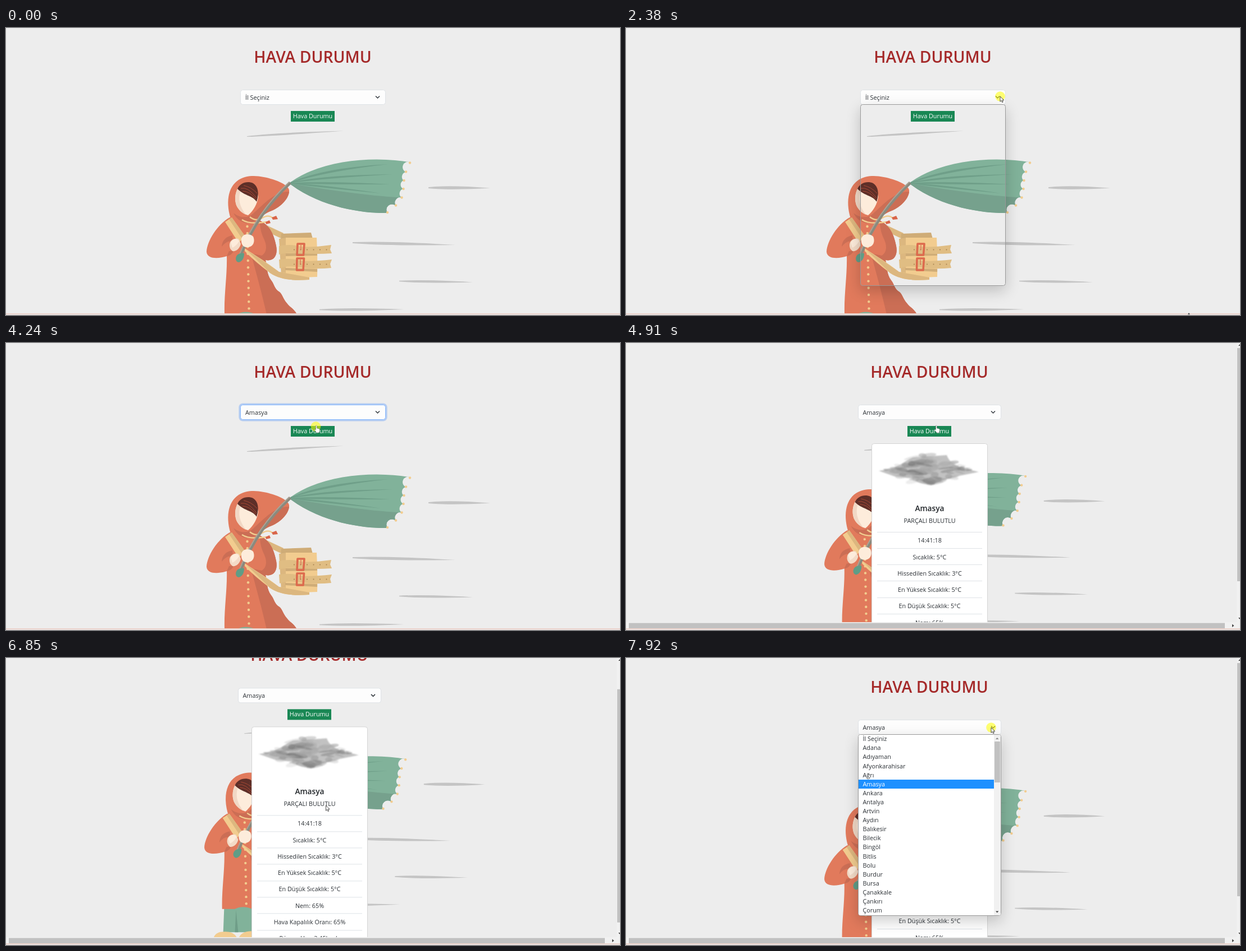
These frames come from a looping animation (1093 by 512 pixels, 7.99 s). An HTML page:

```html
<!DOCTYPE html>
<html lang="tr">
<head>
<meta charset="utf-8">
<title>Hava Durumu</title>
<style>
html, body { margin: 0; width: 100%; height: 100%; overflow: hidden; background: #ededed; }
body { position: relative; font: 10.8px "Open Sans", "Noto Sans", sans-serif; color: #2b3035; }
div, svg { position: absolute; box-sizing: border-box; white-space: nowrap; }
svg { overflow: visible; left: 0; top: 0; }
#view { left: 0; top: 0; width: 100%; overflow: hidden; }
#scene { width: 1093px; height: 640px; transform-origin: 0 0; }
#page { top: 0; width: 1093px; }
#title { top: 31px; left: 0; width: 1092px; text-align: center; font: 600 28.3px/40px "Open Sans", "Noto Sans", sans-serif; color: #a52a2a; }
#select { top: 109.5px; height: 27px; line-height: 25px; padding-left: 8px; background: #fdfdfd; border: 1px solid #dee2e6; border-radius: 4.5px; }
#select.focus { border-color: #86b7fe; box-shadow: 0 0 0 2.6px rgba(13,110,253,.25); }
#select svg { left: auto; right: 9px; top: 9px; width: 9px; height: 7px; }
#button { left: 507px; top: 148px; width: 78px; height: 19px; font-size: 10.8px; line-height: 18.5px; text-align: center; background: #198754; color: #fff; }
#card { left: 443px; top: 178.5px; width: 206.5px; height: 393px; background: #fff; border: 1px solid #d4d4d4; border-radius: 4.5px; text-align: center; }
#card div { left: 9px; width: 187px; height: 20px; line-height: 20px; }
#card .rule { height: 1px; background: #dee2e6; }
#card .city { font-size: 13.7px; font-weight: 600; color: #212529; }
#popup { top: 136px; height: 323.5px; border: 1px solid #999; border-radius: 4.5px; box-shadow: 0 9px 26px rgba(0,0,0,.2); overflow: hidden; }
#list { inset: 0; background: #fff; }
#list .row { left: 0; right: 11.5px; height: 16.1px; line-height: 16.1px; padding-left: 8px; }
#list .on { background: #1e90ff; color: #fff; }
#bar { right: 0; top: 0; width: 11.5px; height: 100%; background: #f1f1f1; }
#bar div { left: 1px; top: 12px; width: 9.5px; height: 73px; background: #c1c1c1; }
#foot { left: 0; top: 509.3px; width: 100%; height: 2px; background: #ecd3cc; }
</style>
</head>
<body>
<div id="view">
  <svg id="scene">
    <g id="wind" fill="#c4c4c4"></g>
    <!-- legs -->
    <path fill="#81b29a" d="M393 500H475V552H391Z"/>
    <path fill="#6f9d88" d="M414 512L418 552H412Z"/>
    <path fill="#f2cc8f" d="M373 565Q375 551 393 551Q412 550 417 565ZM418 565Q422 550 442 550Q465 552 468 565Z"/>
    <!-- far strap and bag -->
    <path fill="#dcb77f" d="M462 351L494 366L489 375L466 364Z"/>
    <path fill="#cfac77" d="M490 367L543 365L546 376L489 378Z"/>
    <path fill="#dcb77f" d="M486 376L500 374L502 446L490 442Z"/>
    <path fill="#f2cc8f" d="M498 374L553 374Q555 410 554 444L498 446Z"/>
    <path fill="#cfac77" d="M497 428L554 430V435L497 432ZM498 402L554 401V406L498 407Z"/>
    <!-- coat -->
    <path fill="#e17a5c" d="M398 338C376 351 358 380 357 399C358 414 381 411 393 407C394 440 388 475 389 510L412 510Q426 503 443 510L518 511C512 500 506 499 500 491C493 483 492 475 487 471C477 465 478 457 472 450C464 440 465 426 462 414C478 417 484 404 481 389C477 368 469 352 450 342Z"/>
    <path fill="#cb6e55" d="M452 344C470 352 477 368 481 389C484 404 478 417 462 414C465 426 464 440 472 450C478 457 477 465 487 471C492 475 493 483 500 491C506 499 512 500 518 511L464 511C456 475 446 440 436 402L455 406C463 402 466 390 459 376C454 365 452 356 452 344Z"/>
    <path fill="#cb6e55" d="M403 370C391 372 385 379 384 390Q393 378 404 381ZM393 407Q403 405 405 397L397 398Z"/>
    <g id="buttons" fill="#f2cc8f"></g>
    <!-- hood and face -->
    <path fill="#e17a5c" d="M401 343C391 314 394 284 414 271C433 259 458 265 475 270C490 275 506 283 504 292C503 305 488 321 468 328C451 336 445 350 428 350C414 350 406 348 401 343Z"/>
    <path fill="#cb6e55" d="M504 292C503 305 488 321 468 328C451 336 445 349 428 348C417 346 409 339 405 330C414 338 430 341 440 331C456 317 478 291 504 292Z"/>
    <path fill="#fdecdb" d="M413 285C407 296 407 307 410 316C414 325 424 333 431 334C440 327 448 313 449 300C448 286 421 275 413 285Z"/>
    <path fill="#f1d8c5" d="M413 286C407 296 407 307 410 316C413 324 420 330 427 333C416 319 412 304 418 290Z"/>
    <path fill="#5e2f28" d="M412 287C416 277 429 272 440 277C449 283 451 295 446 310C440 299 425 300 412 287Z"/>
    <path fill="none" stroke="#a94a37" d="M418 286Q431 283 446 303M423 281Q436 283 447 295M421 291Q434 291 444 305"/>
    <path fill="none" stroke="#f2cc8f" stroke-width="2.4" d="M420 342Q433 351 464 346M434 337Q445 346 456 339T475 339"/>
    <path fill="#d9654a" d="M462 346L469 343L471 348L463 350ZM473 338L481 335L484 341L475 342Z"/>
    <!-- near strap, belts -->
    <path fill="#f2cc8f" d="M390 346L402 338L426 372L414 383ZM425 393C447 408 465 418 486 435L540 444V449C510 451 488 449 470 437Q442 416 425 398Z"/>
    <path fill="#dcb77f" d="M402 338L426 372L421 377L397 341ZM428 396Q455 413 486 435L540 445V449C510 451 488 449 470 437Q460 427 428 396Z"/>
    <path fill="#e0bd83" d="M486 389Q505 385 520 389T579 387L577 395L580 402Q550 404 525 402T486 404ZM486 413Q505 410 520 414T580 413L577 421L579 428Q550 431 525 427T487 429Z"/>
    <g id="holes" fill="#a57f4f"></g>
    <g fill="none" stroke="#dd6a4d" stroke-width="3.6">
      <path d="M519 385H531L529.5 405H518ZM518 411H530.5L529 432H517.5Z" stroke-linejoin="round"/>
      <path d="M525 387V396M524 413V422" stroke-width="1.2"/>
    </g>
    <!-- umbrella -->
    <path fill="#81b29a" d="M504 277C545 246 605 234.500 660 234.500Q695 235 719 239.500A9 9 0 0 0 712 257A8.500 8.500 0 0 0 708 272A8 8 0 0 0 707.500 287A8.500 8.500 0 0 0 704.500 302.500A9.500 9.500 0 0 0 694 317A10 10 0 0 0 679 330C640 331 562 322 504 277Z"/>
    <path fill="#76a18d" d="M504 277C562 287 640 299 704.500 302.500A9.500 9.500 0 0 0 694 317A10 10 0 0 0 679 330C640 331 562 322 504 277Z"/>
    <g id="folds" fill="#6f9f89"></g>
    <g id="tips" fill="#f2cc8f"></g>
    <path fill="none" stroke="#8a8a7e" stroke-width="5.500" d="M506 276C466 313 437 357 418 404"/>
    <path fill="none" stroke="#a9a497" stroke-width="1.800" d="M504 275C464 312 435 356 416 403"/>
    <path fill="#5f9d86" d="M409 411C410 403 417 401 424 402C424 411 420 417 414 418Q409 417 409 411Z"/>
    <!-- hands -->
    <path fill="#f3dbc7" d="M398 386C399 378 407 374 414 376L418 385C416 394 409 399 403 398Q397 393 398 386Z"/>
    <path fill="#fdecdb" d="M400 383C404 375 412 374 415 380Q411 388 403 392ZM419 376C421 366 434 366 440 372C444 381 440 391 430 391C421 392 418 384 419 376Z"/>
  </svg>
  <div id="page">
    <div id="title">HAVA DURUMU</div>
    <div id="select"><span id="value"></span>
      <svg viewBox="0 0 9 7"><path d="M1 1.500L4.500 5L8 1.500" fill="none" stroke="#343a40" stroke-width="1.500"/></svg>
    </div>
    <div id="button">Hava Durumu</div>
    <div id="card"><svg id="cloud" width="204" height="90"></svg></div>
  </div>
</div>
<div id="popup">
  <div id="list">
    <div id="bar"><div></div>
      <svg width="11" height="321"><path d="M3 8L5.700 5L8.400 8Z" fill="#8a8a8a"/><path d="M3 314.500L5.700 317.500L8.400 314.500Z" fill="#444"/></svg>
    </div>
  </div>
</div>
<svg id="bars" width="1093" height="512">
  <path fill="#f1f1f1" d="M0 498H1093V510H0ZM1087 0H1093V498H1087Z"/>
  <path fill="#c1c1c1" d="M5 499.500H1066V509H5Z"/>
  <rect id="thumb" x="1088" width="5" height="416" fill="#c1c1c1"/>
  <path fill="#444" d="M1079 501.500L1082.500 504.300L1079 507ZM1090 5L1093 2V5ZM1090 490L1093 493V490Z"/>
  <path fill="#999" d="M0 502V506L-2 504Z"/>
</svg>
<div id="foot"></div>
<svg id="top" width="1093" height="512">
  <path id="speck" d="M1000 511L1002 508L1004 511Z" fill="#444"/>
  <g id="cursor">
    <circle id="click" r="8.800" fill="#ff0" opacity=".55"/>
    <path id="arrow" d="M0 0V9.300L2.200 7.300L3.700 10.700L5.200 10L3.800 6.800H6.700Z" fill="#fff" stroke="#222" stroke-width=".8"/>
    <path id="hand" d="M0 -1.500Q1.200 -2.500 2 -1V3L6 4Q7.400 4.500 7 7L6 11H1.500L-2 6.500Q-2.500 5 -1 5L0 6Z" fill="#fff" stroke="#555" stroke-width=".5"/>
  </g>
</svg>
<script>
const LOOP = 7990, RESULT = 4560, ROW = 16.1;
const $ = id => document.getElementById(id);
const show = (id, on) => $(id).style.display = on ? "" : "none";
const within = (t, a, b) => t >= a && t < b;

let seed = 11;
const rnd = (a, b) => {
  seed = (seed * 16807) % 2147483647;
  return a + (b - a) * seed / 2147483647;
};

// Tapered stroke, thickest near its middle
const lens = (x1, y1, x2, y2, w, bend = 0) => {
  const mx = x1 + (x2 - x1) * .35, my = y1 + (y2 - y1) * .35 + bend;
  return `<path d="M${x1} ${y1 - w / 5}Q${mx} ${my - w} ${x2} ${y2}Q${mx} ${my + w} ${x1} ${y1 + w / 5}Z"/>`;
};
const dots = (points, r) => points.map(([x, y]) => `<circle cx="${x}" cy="${y}" r="${r}"/>`).join("");
const add = (parent, cls, top, text = "") => {
  const e = document.createElement("div");
  e.className = cls;
  e.style.top = top + "px";
  e.textContent = text;
  $(parent).append(e);
  return e;
};

$("wind").innerHTML = lens(429, 193.5, 601, 183.5, 3, -1) + lens(752, 285, 862, 285.5, 5, -.5) +
  lens(617, 383, 800, 387, 4.5) + lens(700, 451.5, 831, 453.5, 4) + lens(558, 502.5, 709, 502, 4);
$("folds").innerHTML = lens(506, 276, 680, 243, 3.5, -12) + lens(506, 276, 688, 261, 3, -6) +
  lens(506, 277, 684, 279, 3, -2) + lens(506, 277, 668, 295, 3, -1);
$("tips").innerHTML = dots([[719, 240.5], [712, 256.5], [708.5, 272], [707.5, 287], [704.5, 302.5], [694, 316.5], [679, 329]], 2.2);
$("buttons").innerHTML = dots(Array.from({ length: 13 }, (_, i) => [429.5 + i * .25, 354 + i * 12.2]), 2.2);
$("holes").innerHTML = dots(Array.from({ length: 12 }, (_, i) => [513 + i % 6 * 11.5, i < 6 ? 395.5 : 421.5]), 1);

// Cloud: soft grey smears inside a ragged envelope
let smears = "";
for (let i = 0; i < 100; i++) {
  const u = rnd(0, 1), body = Math.sin(Math.PI * u), x = 24 + 152 * u;
  const y = 46 + rnd(-26, 24) * body, rx = rnd(5, 14) * (.4 + body), g = rnd(110, 190) | 0;
  smears += `<ellipse cx="${x}" cy="${y}" rx="${rx}" ry="${rnd(1, 4.5) * (.3 + body)}" fill="rgb(${g},${g},${g})" opacity="${rnd(.25, .6)}" transform="rotate(${rnd(-14, 14)} ${x} ${y})"/>`;
}
$("cloud").innerHTML = `<filter id="soft"><feGaussianBlur stdDeviation="1.3"/></filter><g filter="url(#soft)">
  <path d="M12 48Q40 44 55 34T75 24L133 20Q138 35 158 42L190 50L150 58Q130 62 105 74L80 62L40 58Z" fill="#999" opacity=".6"/>${smears}</g>`;

add("card", "city", 105, "Amasya");
add("card", "", 127.5, "PARÇALI BULUTLU");
["14:41:18", "Sıcaklık: 5°C", "Hissedilen Sıcaklık: 3°C", "En Yüksek Sıcaklık: 5°C", "En Düşük Sıcaklık: 5°C",
  "Nem: 65%", "Hava Kapalılık Oranı: 65%", "Rüzgar Hızı: 3.45km/s"].forEach((text, i) => {
  add("card", "rule", 157 + 29.3 * i);
  add("card", "", 162.7 + 29.3 * i, text);
});

const rows = ("İl Seçiniz,Adana,Adıyaman,Afyonkarahisar,Ağrı,Amasya,Ankara,Antalya,Artvin,Aydın,Balıkesir,Bilecik," +
  "Bingöl,Bitlis,Bolu,Burdur,Bursa,Çanakkale,Çankırı,Çorum").split(",").map((name, i) => add("list", "row", ROW * i - .8, name));

const smooth = u => u * u * (3 - 2 * u);
const track = (keys, t, ease = u => u) => {
  const n = keys.findIndex(k => k[0] > t);
  if (n < 1) return keys.at(n ? -1 : 0).slice(1);
  const a = keys[n - 1], b = keys[n], u = ease((t - a[0]) / (b[0] - a[0]));
  return a.slice(1).map((v, i) => v + (b[i + 1] - v) * u);
};
const mouse = [[180, 1050, 516], [960, 668, 220], [1180, 667.5, 220], [1380, 667, 220], [1760, 643, 92], [2120, 664.5, 120],
  [2380, 666, 122], [2460, 666, 122], [2980, 503, 225], [3640, 503, 225], [4100, 551.5, 149], [5070, 551.5, 149],
  [5460, 639, 152], [5660, 639, 152], [5930, 569.5, 263], [7070, 569.5, 263], [7590, 650, 124]];
const wheel = [[5930, 0], [5990, 17], [6060, 43], [6130, 62], [6260, 73], [6849, 73], [6850, 57], [6950, 22], [7090, 0]];

function draw(t) {
  const done = t >= RESULT, [scroll] = track(wheel, t), [x, y] = track(mouse, t, smooth);
  const width = done ? 255 : 258.5, left = done ? 412.5 : 417, shift = done ? -6 : 0;

  $("view").style.height = (done ? 498 : 509.5) + "px";
  $("scene").style.transform = `translateY(${-scroll}px) scale(${done ? .989 : 1})`;
  $("page").style.transform = `translate(${shift}px, ${-scroll}px)`;
  $("select").style.left = left - shift + "px";
  $("select").style.width = $("popup").style.width = width + "px";
  $("select").className = within(t, 2460, 4310) ? "focus" : "";
  $("value").textContent = t < 3640 ? "İl Seçiniz" : "Amasya";
  show("card", done);
  show("bars", done);
  $("thumb").setAttribute("y", 9 + scroll * .825);

  const open = within(t, 2380, 3640) || t >= 7790;
  show("popup", open);
  $("popup").style.left = left + "px";
  show("list", t >= 7850 || within(t, 2460, 3640));
  const hover = done ? 5 : y > 137 ? Math.floor((y - 137) / ROW) : 0;
  rows.forEach((row, i) => row.classList.toggle("on", i === hover));

  const onButton = !open && within(x, 507 + shift, 585 + shift) && within(y, 148 - scroll, 167 - scroll);
  show("cursor", t >= 240);
  show("arrow", !onButton);
  show("hand", onButton);
  show("click", within(t, 2380, 2460) || within(t, 3440, 3580) || within(t, 4240, 4310) || t >= 7730);
  $("cursor").setAttribute("transform", `translate(${x} ${y})`);
  show("speck", within(t, 2380, 2460));
}

const start = performance.now();
function tick() {
  draw((performance.now() - start) % LOOP);
  requestAnimationFrame(tick);
}
tick();
</script>
</body>
</html>
```
